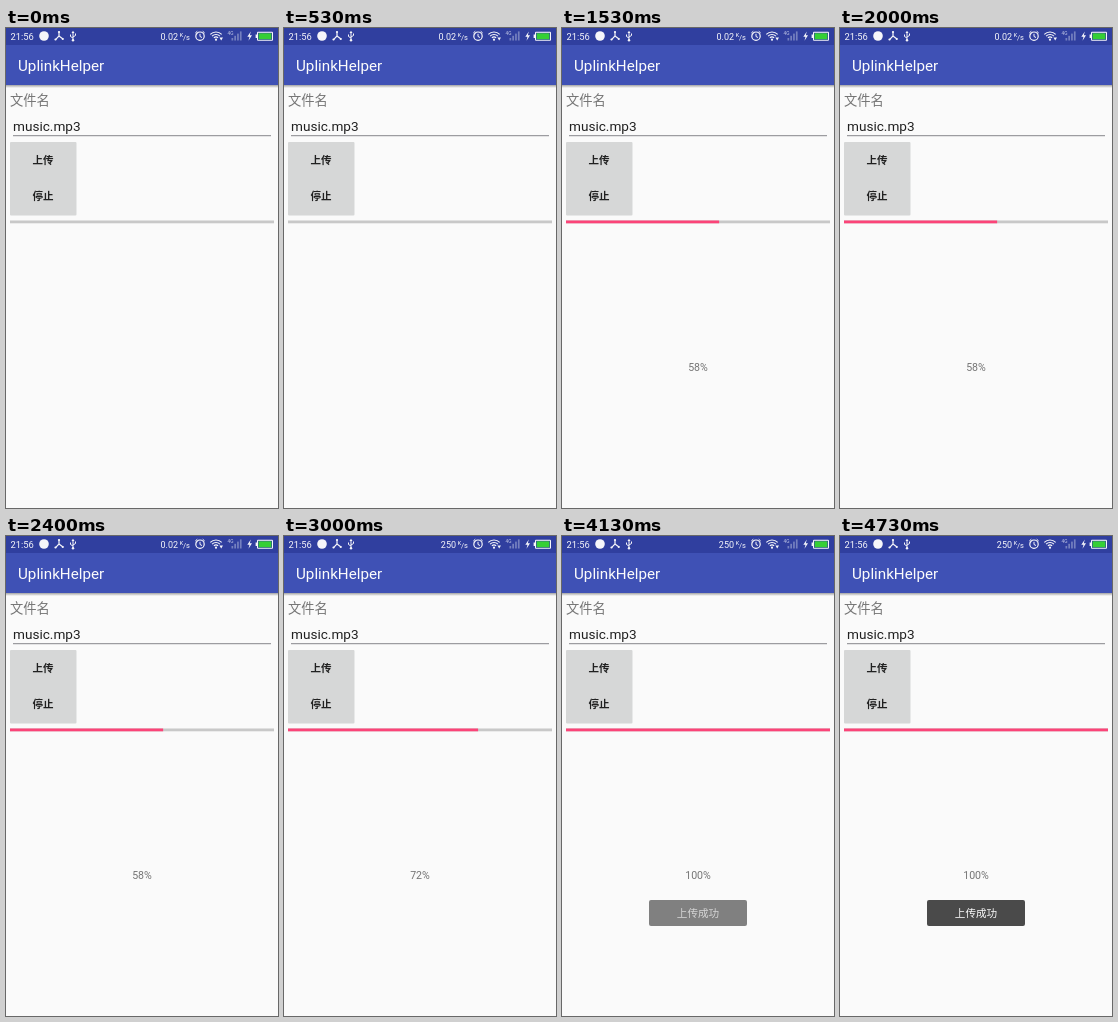
These frames come from a looping animation (272 by 480 pixels, 4870 ms). An HTML page with a canvas:

```html
<!DOCTYPE html>
<html lang="zh-CN">
<head>
<meta charset="utf-8">
<title>UplinkHelper</title>
<style>
  html, body { margin: 0; width: 100%; height: 100%; overflow: hidden; background: #fafafa; }
  canvas { display: block; width: 272px; height: 480px; }
</style>
</head>
<body>
<canvas id="stage"></canvas>
<script>
const W = 272, H = 480, LOOP = 4870, STEP = 200 / 3;
const LATIN = 'Roboto, "Noto Sans", sans-serif';
const CJK = '"Noto Sans CJK SC", "Noto Sans CJK", sans-serif';
const PAGE = '#fafafa', STATUS = '#303f9f', HEADER = '#3f51b5';
const WHITE = '#f6f6fa', GREY = '#757575', DIM = '#7580bf';
const canvas = document.getElementById('stage');
const ctx = canvas.getContext('2d');
const scale = window.devicePixelRatio || 1;
canvas.width = W * scale;
canvas.height = H * scale;

// The upload advances in bursts: [time, percent]
const bursts = [[0, 0], [1460, 58], [2430, 72], [3660, 100]];

function rect(x, y, w, h, color) {
  ctx.fillStyle = color;
  ctx.fillRect(x, y, w, h);
}

function rounded(x, y, w, h, r, color) {
  ctx.fillStyle = color;
  ctx.beginPath();
  ctx.roundRect(x, y, w, h, r);
  ctx.fill();
}

function text(str, x, y, font, color, align = 'left') {
  ctx.font = font;
  ctx.fillStyle = color;
  ctx.textAlign = align;
  ctx.fillText(str, x, y);
}

function poly(points, color) {
  ctx.fillStyle = color;
  ctx.beginPath();
  points.forEach(([x, y]) => ctx.lineTo(x, y));
  ctx.fill();
}

function line(points, width = 1) {
  ctx.strokeStyle = WHITE;
  ctx.lineWidth = width;
  ctx.beginPath();
  points.forEach(([x, y]) => ctx.lineTo(x, y));
  ctx.stroke();
}

function arc(x, y, r, from, to, width) {
  ctx.strokeStyle = WHITE;
  ctx.lineWidth = width;
  ctx.beginPath();
  ctx.arc(x, y, r, from * Math.PI, to * Math.PI);
  ctx.stroke();
}

function disc(x, y, r) {
  ctx.fillStyle = WHITE;
  ctx.beginPath();
  ctx.arc(x, y, r, 0, Math.PI * 2);
  ctx.fill();
}

function leftIcons() {
  disc(38, 8, 4.8);
  // Three-way link
  line([[53, 3.5], [53, 8], [49.3, 11.8]], 1.2);
  line([[53, 8], [57, 11]], 1.2);
  [[53, 4], [49.5, 11.5], [56.8, 11]].forEach(([x, y]) => disc(x, y, 1.1));
  // USB
  line([[67, 4], [67, 12]]);
  line([[64.5, 6.5], [64.5, 8.5], [67, 10]]);
  line([[69.5, 5.5], [69.5, 7.5], [67, 9]]);
  poly([[65.5, 5], [67, 2.8], [68.5, 5]], WHITE);
  disc(67, 12.2, 1.2);
}

function alarmIcon() {
  arc(194, 8.2, 4.2, 0, 2, 1.2);
  line([[194, 5.8], [194, 8.5], [196, 9.5]]);
  line([[189.3, 5], [191.3, 3.2]]);
  line([[198.7, 5], [196.7, 3.2]]);
}

function wifiIcon(t) {
  for (const r of [3, 5.5, 8]) arc(210, 12, r, -0.75, -0.25, 1.2);
  disc(210, 11.7, 1.1);
  const active = t < 600 || t > 1330 && t < 4700;
  if (active) poly([[213.5, 9.5], [217, 9.5], [215.2, 12.6]], WHITE);
}

function signalIcon() {
  text('4G', 221.5, 7, '4.8px ' + LATIN, '#c4c9e6');
  for (let i = 0; i < 4; i++) {
    const h = 2.5 + i * 2.2;
    rect(225.5 + i * 2.8, 12.5 - h, 1.7, h, DIM);
  }
}

function batteryIcon() {
  poly([[244.8, 3.5], [241.3, 8.8], [243.5, 8.8], [242.5, 12.8], [246, 7.3], [243.8, 7.3]], WHITE);
  rounded(251, 3.8, 16, 9, 1, WHITE);
  rect(249.6, 6.5, 1.4, 3.5, WHITE);
  rect(252, 4.8, 14, 7, STATUS);
  rect(252.6, 5.3, 12.8, 6, '#35cf35');
}

function statusBar(t) {
  rect(0, 0, W, 17, STATUS);
  text('21:56', 4.5, 11.5, '9.4px ' + LATIN, WHITE);
  leftIcons();
  text(t < 2730 ? '0.02' : '250', 172, 11.5, '9px ' + LATIN, WHITE, 'right');
  text('K', 173.5, 8.8, '6px ' + LATIN, WHITE);
  text('/s', 177, 11.5, '7.5px ' + LATIN, WHITE);
  alarmIcon();
  wifiIcon(t);
  signalIcon();
  batteryIcon();
}

function titleBar() {
  const shade = ctx.createLinearGradient(0, 57, 0, 60);
  shade.addColorStop(0, 'rgba(0,0,0,.35)');
  shade.addColorStop(1, 'rgba(0,0,0,0)');
  rect(0, 57, W, 3, shade);
  rect(0, 17, W, 40, HEADER);
  text('UplinkHelper', 12, 43, '15.2px ' + LATIN, '#fcfcfc');
}

function form() {
  text('文件名', 4, 76.5, '13.3px ' + CJK, GREY);
  text('music.mp3', 7, 102.5, '13.6px ' + LATIN, '#212121');
  rect(7, 107.2, 258, 1, '#86868a');
  rounded(4, 114, 66.5, 73.5, 1, '#d6d7d7');
  text('上传', 37, 136, 'bold 10.5px ' + CJK, '#212121', 'center');
  text('停止', 37, 172, 'bold 10.5px ' + CJK, '#212121', 'center');
}

function progress(t) {
  const percent = bursts.findLast(([from]) => t >= from)[1];
  rect(4, 192.5, 264, 2.8, '#c8c8c8');
  if (!percent) return;
  rect(4, 192.5, 264 * percent / 100, 2.8, '#fb4478');
  text(percent + '%', 136, 343, '10.6px ' + LATIN, GREY, 'center');
}

function toast(t) {
  const k = Math.min(1, Math.max(0, (t - 3920) / 480));
  ctx.globalAlpha = 1 - (1 - k) ** 2;
  rounded(87, 364, 98, 26, 2, '#4a4a4a');
  text('上传成功', 136, 381, '10.6px ' + CJK, '#fafafa', 'center');
  ctx.globalAlpha = 1;
}

function draw(now) {
  const t = Math.floor(now % LOOP / STEP + 0.05) * STEP;
  ctx.setTransform(scale, 0, 0, scale, 0, 0);
  rect(0, 0, W, H, PAGE);
  titleBar();
  statusBar(t);
  form();
  progress(t);
  toast(t);
}

const start = performance.now();
function tick() {
  draw(performance.now() - start);
  requestAnimationFrame(tick);
}
tick();
</script>
</body>
</html>
```
